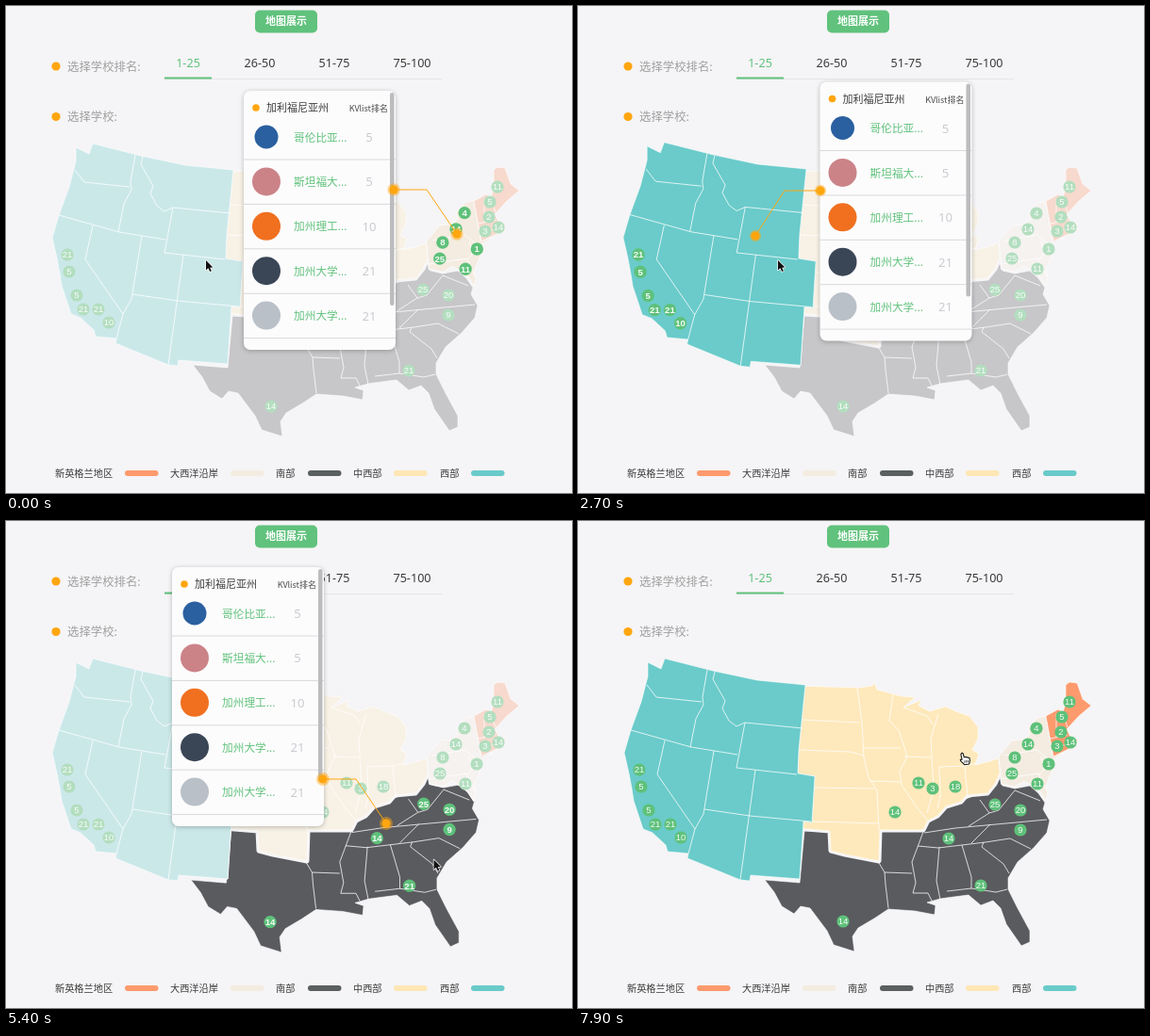
Recreate the animation shown at these times as an HTML page with a canvas. Size 600x517 px, loop 8 s.

```html
<!DOCTYPE html>
<html lang="zh-CN">
<head>
<meta charset="utf-8">
<title>地图展示</title>
<style>
html, body { margin: 0; width: 100%; height: 100%; overflow: hidden; background: #f5f4f6; }
canvas { display: block; width: 600px; height: 517px; }
</style>
</head>
<body>
<canvas id="stage"></canvas>
<script>
const LOOP = 8000;
const FADE = 420;
const BG = '#f5f4f6';
const GREEN = '#60c27c';
const ORANGE = '#ffa60f';
const CJK = '"Noto Sans CJK SC", "Noto Sans CJK", sans-serif';
const LATIN = '"Noto Sans", "Open Sans", sans-serif';

const canvas = document.getElementById('stage');
const ctx = canvas.getContext('2d');
const dpr = window.devicePixelRatio || 1;
canvas.width = 600 * dpr;
canvas.height = 517 * dpr;

const clamp = v => Math.max(0, Math.min(1, v));
const ease = v => { v = clamp(v); return v * v * (3 - 2 * v); };
const mix = (a, b, k) => a + (b - a) * k;
const channels = hex => hex.match(/\w\w/g).map(h => parseInt(h, 16));
const blend = (hex, k) => {
  const base = channels(BG);
  return 'rgb(' + channels(hex).map((v, i) => Math.round(mix(base[i], v, k))) + ')';
};

// Regions overlap: each later one hides the rough edge of the one below.
const regions = new Map();
function addRegion(key, color, gap, center, outline, borders, badges) {
  regions.set(key, { color, gap, center, badges, shape: new Path2D(outline + 'Z'), borders: new Path2D(borders) });
}

const southEdge = 'M240,329 300,329 366,326 375,314 400,299 430,288 444,275 447,266 450,281 463,284 479,281 ' +
  '488,289 495,299 493,306 500,318 497,331 483,347 466,362 456,379 456,391 466,411 479,435 479,447 470,451 ' +
  '454,428 448,411 440,403 427,408 414,397 391,400 384,401 370,405 379,408 378,418 357,414 329,412 314,422 ' +
  '297,432 291,441 293,457 271,450 264,435 246,411 236,409 229,417 216,409 208,394 198,381 235,384';
const southLines = 'M319,363 325,373 326,386 329,411M325,373 354,374M366,330 354,362 358,384 355,395 371,395 375,403' +
  'M367,331 400,326 497,317M360,345 382,347 432,341 458,337 480,348M437,322 417,342M383,346 380,382 384,402' +
  'M407,344 417,378 417,390 391,393M417,390 443,394 455,391M430,341 428,346 451,364 457,374' +
  'M426,296 436,310 414,324M436,310 446,307 463,286 490,297';
addRegion('south', '#5a5b5f', 0, [370, 370], southEdge, southLines,
  [[281, 425, 14], [393, 337, 14], [427, 387, 21], [442, 301, 25], [469, 307, 20], [469, 328, 9]]);

const midwestEdge = 'M230,175 298,177 312,175 314,171 317,179 343,186 357,187 345,198 364,190 361,196 373,202 ' +
  '389,197 403,203 415,207 424,219 424,231 418,243 425,247 421,259 437,255 450,250 447,268 442,279 434,289 ' +
  '412,291 406,298 390,303 381,313 371,318 366,328 320,328 319,361 283,354 268,350 267,329 230,326';
const midwestLines = 'M238,211 298,214M235,243 288,245 303,249M296,177 301,214 303,251 308,272 317,286 319,328' +
  'M302,241 342,241M309,276 342,277M250,283 314,284M248,319 319,321' +
  'M334,184 330,212 340,222 349,250 341,266 343,280 359,304 371,318M346,250 374,251M345,198 370,207 376,216' +
  'M382,205 374,231 377,285 370,310M381,305 384,292 383,261 410,260 422,257M410,260 413,292';
addRegion('midwest', '#fee9bc', 5, [340, 260], midwestEdge, midwestLines,
  [[361, 278, 11], [376, 284, 3], [400, 282, 18], [336, 309, 14]]);

const atlanticEdge = 'M446,250 460,233 472,232 479,227 477,220 487,209 496,207 503,249 516,246 500,255 503,264 ' +
  '496,281 498,288 496,297 490,287 480,280 473,276 463,282 449,279';
addRegion('atlantic', '#f4ece1', 2, [475, 254], atlanticEdge,
  'M452,249 486,243 500,254M447,274 488,268 497,287M491,250 494,264 489,269',
  [[486, 220, 4], [477, 237, 14], [463, 251, 8], [460, 268, 25], [487, 279, 11], [499, 258, 1]]);

const englandEdge = 'M496,207 509,200 514,203 517,194 517,174 521,171 529,172 535,189 544,196 531,207 518,221 ' +
  '524,233 529,231 528,238 504,250';
addRegion('england', '#fd9a6e', 1, [515, 210], englandEdge,
  'M507,205 507,230M501,231 519,227M502,241 519,237M513,202 519,219',
  [[521, 192, 11], [513, 208, 5], [512, 224, 2], [508, 239, 3], [522, 235, 14]]);

const westEdge = 'M74,150 88,157 92,146 143,159 190,169 241,174 234,243 233,268 251,271 248,320 239,319 235,380 ' +
  '183,376 182,382 172,381 116,358 117,353 95,351 93,344 79,331 69,327 59,297 57,284 54,268 49,246 56,222 67,192 74,165';
const westLines = 'M73,174 83,187 131,192M137,158 132,187 133,195 125,210 119,240' +
  'M145,160 143,168 156,191 153,199 160,212 168,218 177,214 238,220M177,214 168,262 232,269' +
  'M56,222 120,240 169,248M92,233 84,269 124,327 117,353M144,244 133,311 124,327' +
  'M134,306 182,313 247,319M188,264 172,381';
addRegion('west', '#6acbca', 1, [150, 265], westEdge, westLines,
  [[65, 264, 21], [67, 282, 5], [75, 307, 5], [82, 322, 21], [98, 322, 21], [109, 336, 10]]);

// Selections: active span, popup corner, connector points.
const picks = [
  { key: 'atlantic', from: -2000, to: 960, at: [252, 90], link: [[411, 195], [446, 195], [478, 242]] },
  { key: 'west', from: 2150, to: 4050, at: [256.5, 80.5], link: [[257, 196], [219, 196], [188, 244]] },
  { key: 'south', from: 4950, to: 7330, at: [176, 49], link: [[336, 274], [371, 274], [403, 321]] }
];
const schools = [
  ['哥伦比亚...', 5, '#2a609f', 12.5],
  ['斯坦福大...', 5, '#cb8388', 15],
  ['加州理工...', 10, '#f0701f', 15],
  ['加州大学...', 21, '#3a4656', 15],
  ['加州大学...', 21, '#b9c0c8', 15]
];
const legend = [
  ['新英格兰地区', 52, 126, '#fd9a6e'],
  ['大西洋沿岸', 174, 238, '#f4ece1'],
  ['南部', 286, 320, '#5a5f5f'],
  ['中西部', 368, 411, '#fee7b4'],
  ['西部', 460, 493, '#69cbc9']
];

function text(str, x, y, font, color, align = 'left') {
  ctx.font = font;
  ctx.fillStyle = color;
  ctx.textAlign = align;
  ctx.fillText(str, x, y);
}
function disc(x, y, r, color) {
  ctx.fillStyle = color;
  ctx.beginPath();
  ctx.arc(x, y, r, 0, Math.PI * 2);
  ctx.fill();
}
function box(x, y, w, h, r, color) {
  ctx.fillStyle = color;
  ctx.beginPath();
  ctx.roundRect(x, y, w, h, r);
  ctx.fill();
}
function outline(path, color, width) {
  ctx.strokeStyle = color;
  ctx.lineWidth = width;
  ctx.stroke(path);
}

function drawRegion(r, strength, grow) {
  const [cx, cy] = r.center, s = 1 + 0.011 * grow;
  ctx.save();
  ctx.translate(cx, cy);
  ctx.scale(s, s);
  ctx.translate(-cx, -cy);
  ctx.lineJoin = 'round';
  if (r.gap) outline(r.shape, BG, r.gap);
  ctx.fillStyle = blend(r.color, strength);
  ctx.fill(r.shape);
  outline(r.borders, 'rgba(255,255,255,.85)', 0.9);
  outline(r.shape, 'rgba(255,255,255,.85)', 0.7);
  const weight = grow > 0.5 ? '600 ' : '';
  for (const [x, y, n] of r.badges) {
    disc(x, y, 6.6, blend('#5ec17a', mix(0.2, 1, strength)));
    text(n, x, y + 3.4, weight + '9.5px "Liberation Sans", sans-serif', 'rgba(255,255,255,.93)', 'center');
  }
  ctx.restore();
}

function drawHeader() {
  box(264, 4.5, 66, 24, 5, GREEN);
  text('地图展示', 297, 20.3, 'bold 11px ' + CJK, '#fff', 'center');
  disc(53, 64, 4.6, ORANGE);
  text('选择学校排名:', 65, 69, '12.4px ' + CJK, '#a0a0a0');
  disc(53, 117.5, 4.6, ORANGE);
  text('选择学校:', 65, 122.3, '12.4px ' + CJK, '#a0a0a0');
  ctx.fillStyle = '#e5e4e6';
  ctx.fillRect(168, 77, 294, 1);
  ctx.fillStyle = GREEN;
  ctx.fillRect(168, 75.5, 50, 2);
  const tabs = [['1-25', 193], ['26-50', 269], ['51-75', 348], ['75-100', 430.5]];
  tabs.forEach(([label, x], i) =>
    text(label, x, 65, (i ? '' : '500 ') + '12.6px ' + LATIN, i ? '#3a3a3a' : GREEN, 'center'));
}

function drawLegend() {
  for (const [name, x, bar, color] of legend) {
    text(name, x, 499.8, '10.2px ' + CJK, '#3a3a3a');
    box(bar, 493, 35.5, 6, 3, color);
  }
}

function drawPopup(x, y) {
  ctx.save();
  ctx.translate(x, y);
  ctx.shadowColor = 'rgba(0,0,0,.25)';
  ctx.shadowBlur = 5 * dpr;
  ctx.shadowOffsetY = dpr;
  box(0, 0, 161, 275, 7, '#fdfcfd');
  ctx.shadowColor = 'transparent';
  disc(13, 18, 3.8, ORANGE);
  text('加利福尼亚州', 24, 22, '11px ' + CJK, '#3c3c3c');
  text('KVlist排名', 153, 22, '9px ' + CJK, '#4a4a4a', 'right');
  schools.forEach(([name, rank, color, r], i) => {
    const cy = 49 + 47.4 * i;
    disc(24, cy, r, color);
    text(name, 53, cy + 4.6, '500 11.7px ' + CJK, GREEN);
    text(rank, 133, cy + 5, '13.2px ' + LATIN, '#cbcbd0', 'center');
    ctx.fillStyle = '#d9d9dc';
    ctx.fillRect(0, cy + 23.5, 161, 1);
  });
  box(155, 2, 4.5, 226, 2.2, '#bcbcbe');
  ctx.restore();
}

function drawLink(points, t) {
  ctx.strokeStyle = ORANGE;
  ctx.lineWidth = 1;
  ctx.beginPath();
  points.forEach(p => ctx.lineTo(p[0], p[1]));
  ctx.stroke();
  const wave = Math.sin(t / 1000 * Math.PI * 2);
  for (const [x, y] of [points[0], points[2]]) {
    disc(x, y, 6.7 + 0.6 * wave, 'rgba(255,166,15,.45)');
    disc(x, y, 4.6, ORANGE);
  }
}

const arrow = new Path2D('M0,0V10.5L2.4,8.3 4.2,12 5.9,11.2 4.2,7.7 7.4,7.5Z');
const hand = new Path2D('M1.5,.6Q3,0 3.4,1.4L4.3,4.8 6.7,4.6 8.7,5.2 9.8,5.2 10.4,8 9.7,12 4.7,12.7 .8,8.8 .3,7.3 2.1,7.3 .9,2Z');
const fingers = new Path2D('M4.8,8.2v2.6M6.6,8v2.6M8.3,7.8v2.6');

// Pointer moves: start, end, x, y
const moves = [[2900, 3400, 296, 364], [3600, 4050, 453.5, 359.5], [6500, 7200, 408, 246]];
const handSpans = [[960, 1650], [4000, 5150], [7150, 8000]];

function drawPointer(t) {
  let x = 212, y = 270;
  for (const [from, to, nx, ny] of moves) {
    const k = ease((t - from) / (to - from));
    x = mix(x, nx, k);
    y = mix(y, ny, k);
  }
  ctx.save();
  ctx.translate(x, y);
  ctx.lineJoin = 'round';
  if (handSpans.some(([from, to]) => t >= from && t < to)) {
    ctx.translate(-3, 0);
    ctx.fillStyle = '#fff';
    ctx.fill(hand);
    outline(hand, '#111', 1.1);
    outline(fingers, '#111', 0.7);
  } else {
    outline(arrow, '#fff', 1.4);
    ctx.fillStyle = '#111';
    ctx.fill(arrow);
  }
  ctx.restore();
}

function draw(t) {
  ctx.setTransform(dpr, 0, 0, dpr, 0, 0);
  ctx.fillStyle = BG;
  ctx.fillRect(0, 0, 600, 517);
  drawHeader();

  const pick = picks.find(p => t >= p.from && t < p.to + FADE);
  const focus = pick ? ease((t - pick.from) / FADE) * (1 - ease((t - pick.to) / FADE)) : 0;
  for (const [key, r] of regions) {
    const chosen = pick && key === pick.key;
    drawRegion(r, chosen ? 1 : 1 - 0.7 * focus, chosen ? focus : 0);
  }
  drawLegend();

  if (pick && t < pick.to) {
    ctx.globalAlpha = clamp((t - pick.from) / 200);
    drawPopup(...pick.at);
    drawLink(pick.link, t);
    ctx.globalAlpha = 1;
  }
  drawPointer(t);
}

const start = performance.now();
function tick() {
  draw((performance.now() - start) % LOOP);
  requestAnimationFrame(tick);
}
tick();
</script>
</body>
</html>
```
